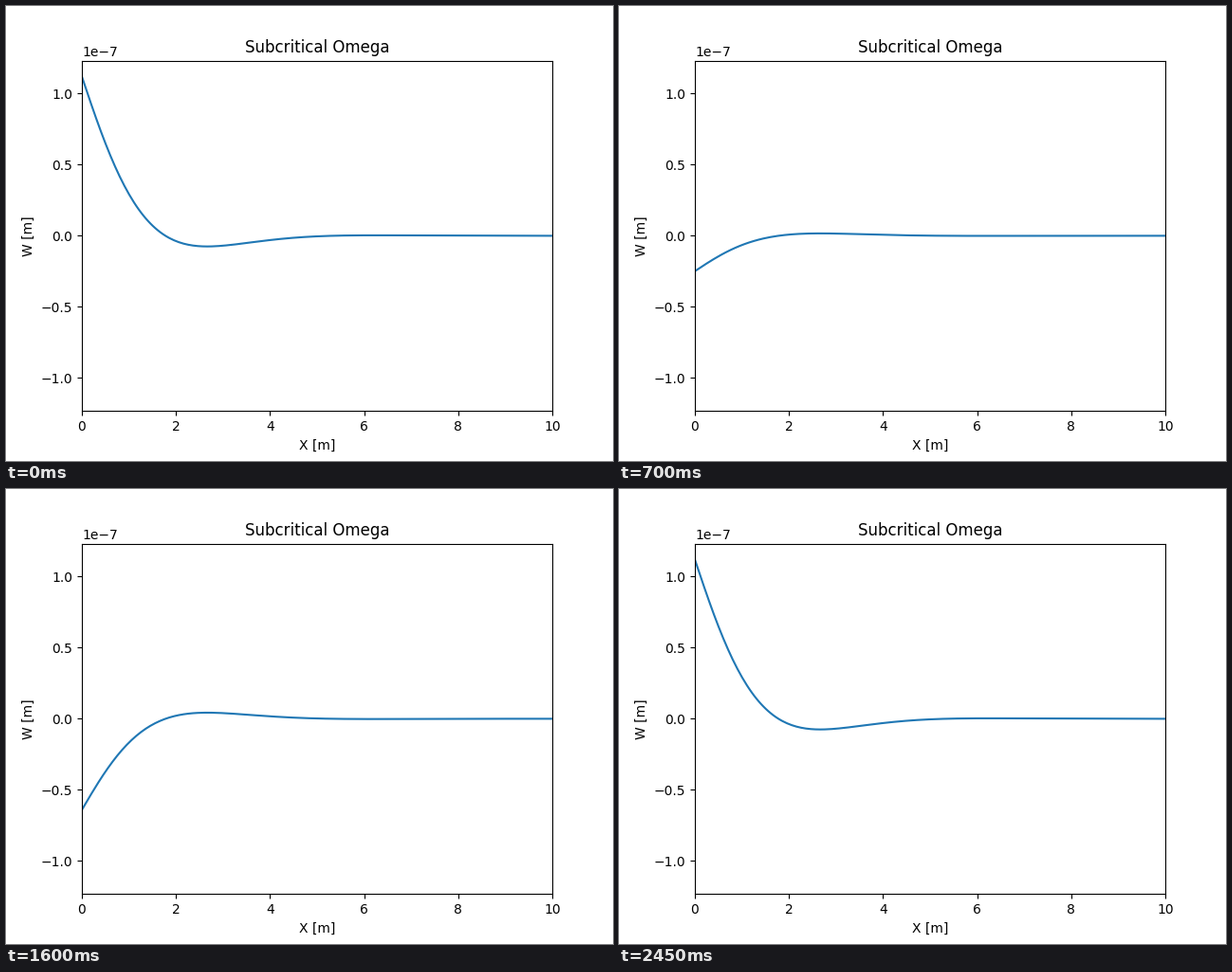
Recreate the animation shown at these times as a matplotlib script. Size 640x480 px, loop 2500 ms.

```python
import matplotlib.pyplot as plt
import numpy as np
from matplotlib.animation import FuncAnimation

FRAMES = 50
AMPLITUDE = 1.12e-7
DECAY = 0.884  # decay rate and wavenumber of the beam, per metre

x = np.linspace(0, 10, 200)
shape = AMPLITUDE * np.exp(-DECAY * x) * np.cos(DECAY * x)

fig, ax = plt.subplots(figsize=(6.4, 4.8), dpi=100)
line, = ax.plot(x, shape, color="#1f77b4", lw=1.5)
ax.set_xlim(0, 10)
ax.set_ylim(-1.1 * AMPLITUDE, 1.1 * AMPLITUDE)
ax.set_title("Subcritical Omega")
ax.set_xlabel("X [m]")
ax.set_ylabel("W [m]")


def update(i):
    # The last frame closes the full period, so it equals the first.
    line.set_ydata(shape * np.cos(2 * np.pi * i / (FRAMES - 1)))
    return line,


anim = FuncAnimation(fig, update, frames=FRAMES, interval=50, repeat=True,
                     repeat_delay=0)
plt.show()
```
